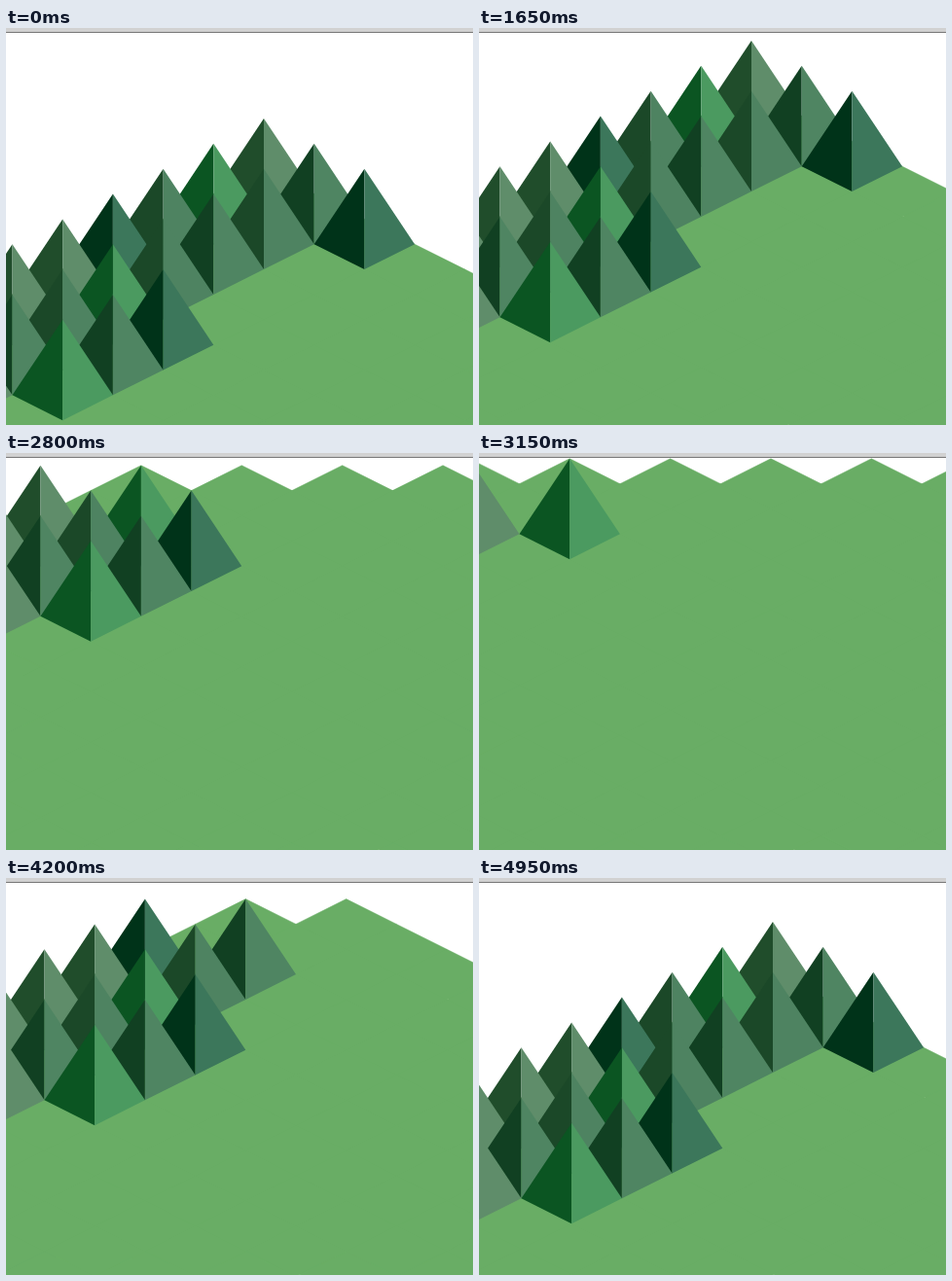
An HTML page for the animation above (5050 ms loop, 480 by 408 pixels).

```html
<!DOCTYPE html>
<html lang="en">
<head>
<meta charset="utf-8">
<title>Isometric forest</title>
<style>
  html, body { margin: 0; width: 100%; height: 100%; overflow: hidden; background: #fff; }
  svg { display: block; width: 100vw; height: 100vh; }
</style>
</head>
<body>
<svg viewBox="0 0 480 408">
  <rect width="480" height="408" fill="#fff"/>
  <g id="world">
    <path id="ground" fill="#69ad65" stroke="#69ad65" stroke-width=".5"/>
    <g id="forest"></g>
  </g>
  <rect width="480" height="4" fill="#d1d1d1"/>
  <rect y="4" width="480" height="1" fill="#777"/>
</svg>
<script>
const LOOP = 5050, STEP = 50;
const W = 51.7, H = 25.85;      // half a tile
const TOP = { x: 265, y: 93 };  // apex of the tree on tile 0,0
const EDGE = 4.5;               // anything starting above this is culled
const SIZE = 26;

// left and right face of each kind of tree
const FACES = {
  dark:   ['#003319', '#3c775b'],
  bright: ['#0b5522', '#4b9a60'],
  mid:    ['#114022', '#4f8562'],
  moss:   ['#1b4828', '#4e8361'],
  light:  ['#204d2b', '#5f8d6a']
};

// rows of trees, each from its first column onwards
const ROWS = [
  [0, 'light bright moss dark light light light'],
  [0, 'mid moss mid moss bright moss mid light'],
  [0, 'dark - - - dark mid bright']
];

// camera drag: time, x, y
const PAN = [
  [0, 0, 0], [1100, 0, 0], [1650, 15, -80], [2200, 20, -114],
  [2400, 22, -153], [2750, 28, -199], [3150, 35, -294], [3300, 35, -294.5],
  [3450, 35, -294.5], [3800, 35, -250], [4000, 34, -197], [4200, 33, -149],
  [4550, 35, -85], [4950, 37, -48], [5050, 37, -48]
];

const world = document.getElementById('world');
const ground = document.getElementById('ground');
const forest = document.getElementById('forest');

const place = (i, j) => ({ x: TOP.x + (i - j) * W, y: TOP.y + (i + j) * H });

function add(parent, tag, attrs) {
  const el = document.createElementNS('http://www.w3.org/2000/svg', tag);
  for (const key in attrs) el.setAttribute(key, attrs[key]);
  return parent.appendChild(el);
}

const trees = ROWS.flatMap(([first, kinds], i) =>
  kinds.split(' ').map((kind, n) => ({ kind, i, j: first + n })))
  .filter(t => t.kind !== '-')
  .sort((a, b) => a.i + a.j - b.i - b.j)
  .map(({ kind, i, j }) => {
    const { x, y } = place(i, j);
    const el = add(forest, 'g', { transform: `translate(${x} ${y})` });
    FACES[kind].forEach((fill, side) => {
      const dx = side ? W : -W;
      add(el, 'path', { fill, d: `M0 0L${dx} ${3 * H}L0 ${4 * H}Z` });
    });
    return { el, y };
  });

function groundPath(cx, cy) {
  let d = '';
  for (let i = 0; i < SIZE; i++) {
    for (let j = 0; j < SIZE; j++) {
      const p = place(i, j), x = p.x, y = p.y + 2 * H;
      if (y + cy < EDGE || y + cy > 410 || Math.abs(x + cx - 240) > 300) continue;
      d += `M${x} ${y}l${W} ${H}l${-W} ${H}l${-W} ${-H}z`;
    }
  }
  return d;
}

// monotone cubic through the drag points, flat where the hand rests
function pan(t, axis) {
  const rate = k => k < 0 || k > PAN.length - 2 ? 0
    : (PAN[k + 1][axis] - PAN[k][axis]) / (PAN[k + 1][0] - PAN[k][0]);
  const slope = k => {
    const a = rate(k - 1), b = rate(k);
    return a * b > 0 ? 2 * a * b / (a + b) : 0;
  };
  let k = 0;
  while (k < PAN.length - 2 && t >= PAN[k + 1][0]) k++;
  const [p, q] = [PAN[k], PAN[k + 1]];
  const span = q[0] - p[0], u = (t - p[0]) / span, v = 1 - u;
  return p[axis] * v * v * (1 + 2 * u) + q[axis] * u * u * (3 - 2 * u)
    + span * u * v * (slope(k) * v - slope(k + 1) * u);
}

function draw(t) {
  const x = pan(t, 1), y = pan(t, 2);
  world.setAttribute('transform', `translate(${x} ${y})`);
  ground.setAttribute('d', groundPath(x, y));
  for (const tree of trees) {
    tree.el.setAttribute('display', tree.y + y < EDGE ? 'none' : 'inline');
  }
}

const start = performance.now();
let last = -1;
function tick() {
  const t = Math.floor((performance.now() - start) % LOOP / STEP) * STEP;
  if (t !== last) draw(last = t);
  requestAnimationFrame(tick);
}
tick();
</script>
</body>
</html>
```
